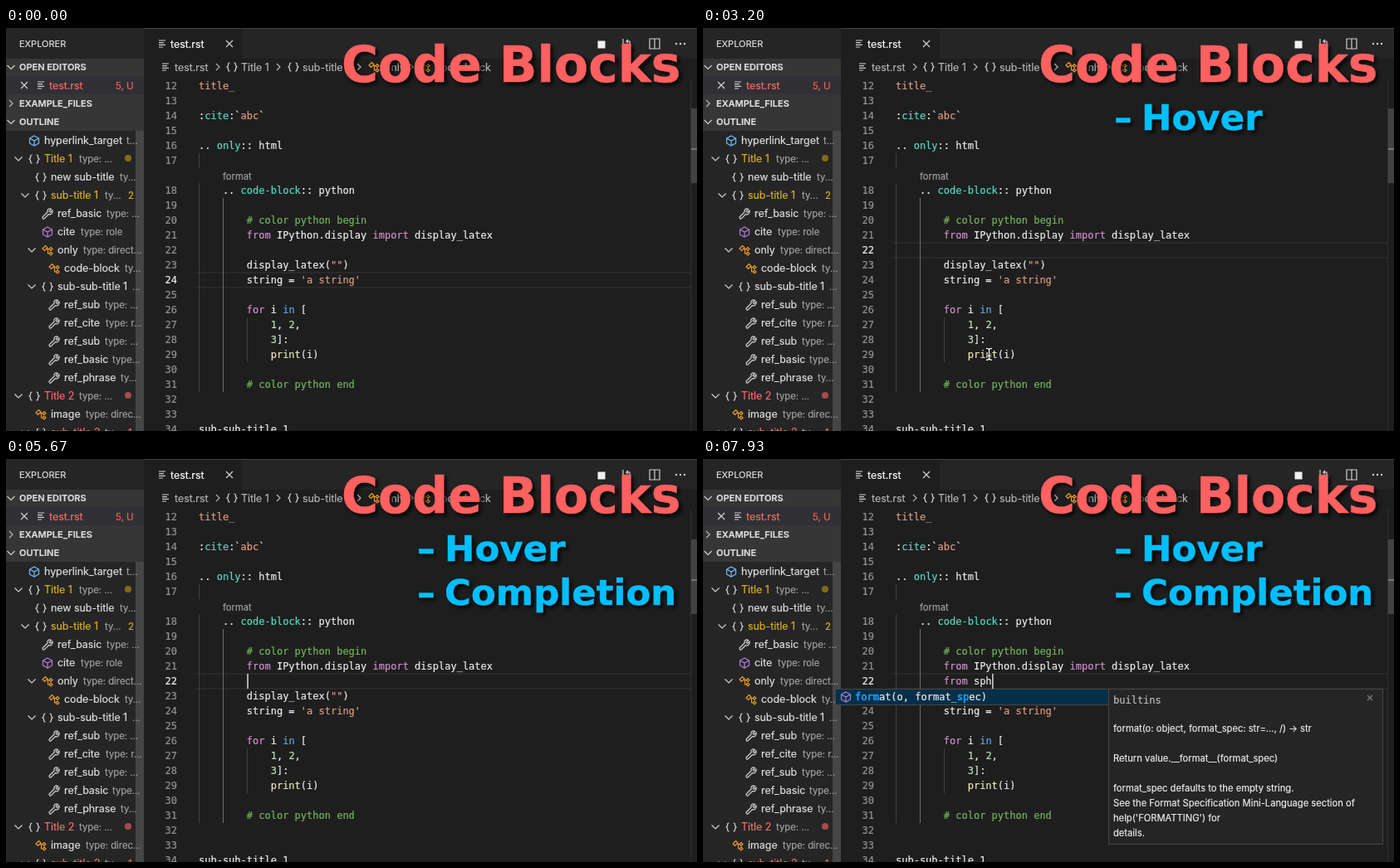
These frames come from a looping animation (832x486 px, 8000 ms). An HTML page:

```html
<!DOCTYPE html>
<html lang="en">
<head>
<meta charset="utf-8">
<title>Code Blocks</title>
<style>
html, body { margin: 0; width: 100%; height: 100%; overflow: hidden; background: #1e1e1e; }
svg { display: block; width: 100vw; height: 100vh; }
text { white-space: pre; font-family: Inter, "Liberation Sans", sans-serif; color: #dedede; fill: currentColor; stroke: currentColor; stroke-width: .2; }
.m { font: 12px "DejaVu Sans Mono", monospace; color: #ebebeb; }
.s { font-size: 12.4px; }
.d { font-size: 11.3px; color: #a0a0a0; }
.h { font-size: 11px; font-weight: 600; }
.t { font-size: 11.5px; color: #ebebeb; }
.u { font-size: 11.2px; color: #ebebeb; }
.big { font-family: "DejaVu Sans", Verdana, sans-serif; font-weight: bold; stroke-width: .5; filter: drop-shadow(3px 3px 2px rgba(0,0,0,.85)); }
.box { fill: #252526; stroke: #454545; }
.ln { fill: none; stroke-width: 1.2; }
</style>
</head>
<body>
<svg id="stage" viewBox="0 0 832 486"></svg>
<script>
const LOOP = 8000, CW = 7.224;
const COL = {
  p: '#cf8fc9', g: '#74b35e', c: '#56d8bf', o: '#db9c82', n: '#c0dbb2', b: '#5ea9e6',
  y: '#e8e8b8', v: '#9cdcfe', r: '#f44747', f: '#18a3ff'
};
const esc = s => s.replace(/&/g, '&amp;').replace(/</g, '&lt;').replace(/>/g, '&gt;');
// "{p word}" paints word with COL.p
const rich = s => esc(s).replace(/\{(\w) ([^}]*)\}/g, (_, k, w) =>
  `<tspan fill="${COL[k]}" stroke="${COL[k]}" stroke-width="${k === 'f' ? .6 : .2}">${w}</tspan>`);
const text = (x, y, s, cls, extra = '') => `<text x="${x}" y="${y}" class="${cls}" ${extra}>${rich(s)}</text>`;
const tint = c => `style="color:${c}"`;
const mono = (x, mid, s, extra) => text(x, mid + 4, s, 'm', extra);
const rect = (x, y, w, h, fill) => `<rect x="${x}" y="${y}" width="${w}" height="${h}" fill="${fill}"/>`;
const panel = (x, y, w, h) => `<rect x="${x + .5}" y="${y + .5}" width="${w - 1}" height="${h - 1}" class="box"/>`;
const path = (d, stroke, x = 0, y = 0) => `<path class="ln" d="${d}" stroke="${stroke}" transform="translate(${x} ${y})"/>`;
const group = (id, body) => `<g id="${id}">${body}</g>`;
const paras = (x, ys, lines, cls) => lines.map((s, i) => text(x, ys[i] + 4.3, s, cls)).join('');

const CUBE = 'M0-6L5.5-3V3L0 6L-5.5 3V-3ZM-5.5-3L0 0L5.5-3M0 0V6';
const icons = {
  cube: (x, y) => path(CUBE, '#75beff', x, y),
  method: (x, y) => path(CUBE, '#b180d7', x, y),
  cls: (x, y) => path('M-6-2L-2.5-5.5L0-3L-3.5 .5ZM-1.5-1.5H2M.5-1.5V4H2M2-1.5L4-3.5L6-1.5L4 .5ZM2 4L4 2L6 4L4 6Z', '#ee9d28', x, y),
  wrench: (x, y) => path('M-6 4L0-2C-1-5 2-7 4.5-5.5L2-3L3.5-1.5L6-4C7-1 4 2 1.5 .5L-4 6Q-6 6.5-6 4Z', '#d0d0d0', x, y),
  obj: (x, y) => path('M-2.5-5Q-4.5-5-4.5-3V-1.5L-6 0L-4.5 1.5V3Q-4.5 5-2.5 5M2.5-5Q4.5-5 4.5-3V-1.5L6 0L4.5 1.5V3Q4.5 5 2.5 5', '#d0d0d0', x, y),
  word: (x, y) => path('M-6-4.5H0M2-4.5H6M-6-1.5H-3M-1-1.5H6M-6 1.5H2M4 1.5H6M-6 4.5H-1M1 4.5H5', '#d0d0d0', x, y),
  file: (x, y) => path('M-4-4H4M-4-1.3H2M-4 1.3H4M-4 4H1', '#d0d0d0', x, y)
};
const down = (x, y) => path('M-4.5-2L0 2.5L4.5-2', '#d0d0d0', x, y);
const right = (x, y) => path('M-2-4L2 0L-2 4', '#b8b8b8', x, y);
const cross = (x, y, r = 4, color = '#d0d0d0') => path(`M${-r} ${-r}L${r} ${r}M${r} ${-r}L${-r} ${r}`, color, x, y);

const GOLD = '#d9b020', RED = '#f56c68';
// label x, icon, label, description x, description, has chevron, colour
const outline = [
  [46, 'cube', 'hyperlink_target', 145, 't...'],
  [46, 'obj', 'Title 1', 88, 'type: ...', 1, GOLD],
  [54, 'obj', 'new sub-title', 137, 'ty...'],
  [54, 'obj', 'sub-title 1', 119, 'ty...', 1, GOLD],
  [62, 'wrench', 'ref_basic', 121, 'type: ...'],
  [62, 'method', 'cite', 90, 'type: role'],
  [62, 'cls', 'only', 93, 'type: direct...', 1],
  [70, 'cls', 'code-block', 143, 'ty...'],
  [62, 'obj', 'sub-sub-title 1', 152, '...', 1],
  [70, 'wrench', 'ref_sub', 119, 'type: ...'],
  [70, 'wrench', 'ref_cite', 120, 'type: r...'],
  [70, 'wrench', 'ref_sub', 119, 'type: ...'],
  [70, 'wrench', 'ref_basic', 128, 'type...'],
  [70, 'wrench', 'ref_phrase', 138, 'ty...'],
  [46, 'obj', 'Title 2', 88, 'type: ...', 1, RED],
  [54, 'cls', 'image', 96, 'type: direc...'],
  [54, 'obj', 'sub-title 2', 119, 'ty...', 1, RED]
];

function sidebar() {
  let s = rect(0, 0, 166, 486, '#252526') + rect(0, 37, 166, 21, '#363637') +
    rect(0, 58, 166, 22, '#303034') + rect(0, 80, 166, 44, '#363637') + rect(156, 124, 10, 362, '#464647');
  s += text(16, 23, 'EXPLORER', 'h', 'style="font-weight:400"');
  s += text(16, 51, 'OPEN EDITORS', 'h') + text(16, 95, 'EXAMPLE_FILES', 'h') + text(16, 117, 'OUTLINE', 'h');
  s += down(6, 47) + right(6, 91) + down(6, 113) + cross(22, 69) + icons.file(42, 69);
  s += text(52, 73.5, 'test.rst', 's', tint(RED)) + text(132, 73.5, '5, U', 't', tint('#e8605e'));
  outline.forEach(([x, icon, label, dx, desc, open, color = '#dedede'], i) => {
    const y = 136 + 22 * i;
    s += icons[icon](x - 12, y) + (open ? down(x - 31, y - .5) : '') +
      text(x, y + 4.3, label, 's', tint(color)) + text(dx, y + 4.3, desc, 'd');
  });
  s += `<circle cx="147" cy="157" r="4" fill="#806c18"/><circle cx="147" cy="443" r="4" fill="#a44c4b"/>`;
  return s + text(147, 206, '2', 't', tint(GOLD)) + text(147, 492, '1', 't', tint(RED));
}

function header() {
  let s = rect(166, 0, 666, 37, '#252526') + rect(166, 0, 119, 37, '#1e1e1e') + rect(0, 0, 832, 1, '#454545');
  s += icons.file(188, 19) + text(198, 23.7, 'test.rst', 's', tint('#fff')) + cross(269, 19);
  s += rect(712.5, 15.5, 9, 9, '#f0f0f0');
  s += path('M-4-6V2M-4 2L-1 2M4 6V-3H0L2-5M0-3L2-1', '#d0d0d0', 747, 19);
  s += path('M-6-6H6V6H-6ZM0-6V6', '#d0d0d0', 781, 19);
  s += [807, 812, 817].map(x => `<circle cx="${x}" cy="19" r="1.2" fill="#d0d0d0"/>`).join('');
  s += icons.file(192, 47) + icons.obj(272, 47) + icons.obj(346, 47) + icons.cls(443, 47) + icons.cls(504, 47);
  s += [255, 328, 425, 488].map(x => right(x, 47)).join('');
  [[203, 'test.rst'], [283, 'Title 1'], [357, 'sub-title 1'], [456, 'only'], [517, 'code-block']]
    .forEach(([x, w]) => s += text(x, 51.7, w, 's', tint('#b4b4b4')));
  return s;
}

// line number: [indent, code]
const code = {
  12: [0, '{o title_}'],
  14: [0, ':{c cite}:`{o abc}`'],
  16: [0, '.. {c only}:: html'],
  18: [4, '.. {c code-block}:: python'],
  20: [8, '{g # color python begin}'],
  21: [8, '{p from} IPython.display {p import} display_latex'],
  23: [8, 'display_latex({o ""})'],
  24: [8, "string = {o 'a string'}"],
  26: [8, '{p for} i {b in} ['],
  27: [12, '{n 1}, {n 2},'],
  28: [12, '{n 3}]:'],
  29: [12, '{y print}(i)'],
  31: [8, '{g # color python end}'],
  34: [0, 'sub-sub-title 1']
};
const lineY = n => n < 18 ? 70 + 18 * (n - 12) : 196 + 18 * (n - 18);
const colX = c => 232 + c * CW;

function editor() {
  let s = rect(232, 151, 1, 18, '#404040') + rect(232, 187, 1, 252, '#404040') +
    rect(261, 205, 1, 234, '#6c6c6c') + rect(290, 349, 1, 54, '#404040');
  for (let n = 12; n <= 34; n++) {
    s += mono(206, lineY(n), '' + n, `id="n${n}" text-anchor="end" ${tint('#909090')}`);
    if (code[n]) s += mono(colX(code[n][0]), lineY(n), code[n][1]);
  }
  s += text(261, 183, 'format', 'u', tint('#a0a0a0'));
  return s + rect(824, 61, 1, 425, '#303030') + rect(825, 97, 7, 90, '#424242') + rect(825, 145, 7, 2, '#777');
}

const hoverLatex = () => panel(319, 68, 502, 175) + rect(320, 95, 500, 1, '#404040') +
  mono(327, 82, 'display_latex(*objs, {v raw}={b False}, {v metadata}={b None})') +
  text(327, 113.3, 'Display the LaTeX representation of an object.', 't') +
  text(327, 148.5, 'Parameters', 't', 'style="font-size:17.8px;font-weight:600"') +
  paras(327, [175, 193, 211, 229], [
    'objs : tuple of objects The Python objects to display, or if raw=True raw latex data to',
    'display. raw : bool Are the data objects raw data or Python objects that need to be',
    'formatted before display? [default: False] metadata : dict (optional) Metadata to be',
    'associated with the specific mimetype output.'], 't');

const hoverPrint = () => panel(319, 234, 502, 153) +
  rect(320, 279, 500, 1, '#404040') + rect(320, 306, 500, 1, '#404040') +
  mono(327, 248, '{y print}(*values: {c object}, sep: {c Text}=..., end: {c Text}=..., {v file}: Optiona') +
  mono(327, 266, 'l[_Writer]=..., {v flush}: {c bool}=...) {r ->} {b None}') +
  paras(327, [293, 319, 337, 355, 373], [
    "print(value, ..., sep=' ', end='\\n', file=sys.stdout, flush=False)",
    'Prints the values to a stream, or to sys.stdout by default. Optional keyword arguments:',
    'file: a file-like object (stream); defaults to the current sys.stdout. sep: string inserted',
    'between values, default a space. end: string appended after the last value, default a',
    'newline. flush: whether to forcibly flush the stream.'], 't');

const list = items => panel(159, 277, 330, items.length * 18 + 2) + rect(160, 278, 328, 18, '#062f4a') +
  items.map(([icon, s], i) => icons[icon](172, 287 + 18 * i) + mono(183, 287 + 18 * i, s)).join('');
const docs = (h, ys, lines) => panel(488, 277, 331, h) + mono(494, 291, 'builtins', tint('#bcbcbc')) +
  cross(803, 288, 3, '#808080') + paras(494, ys, lines, 'u');

const listF = () => list([
  ['method', '{f f}ilter(function, iterable)'], ['cls', '{f f}loat'], ['word', '{f f}or'],
  ['method', '{f f}ormat(o, format_spec)'], ['word', '{f f}rom'], ['cls', '{f f}rozenset'], ['word', '{f F}alse'],
  ['cls', '{f F}ileExistsError'], ['cls', '{f F}ileNotFoundError'], ['cls', '{f F}loatingPointError'],
  ['cls', '{f F}utureWarning']
]) + docs(230, [325, 343, 361, 379, 415, 451, 469, 487], [
  'filter(function: Callable[[_T], Any], iterable: Iterable[_T], /) ->', 'Iterator[_T]',
  'filter(function: None, iterable: Iterable[Optional[_T]], /) ->', 'Iterator[_T]',
  'filter(function or None, iterable) --> filter object',
  'Return an iterator yielding those items of iterable for', 'which function(item)',
  'is true. If function is None, return the items that are true.'
]);
const listFr = () => list([['word', '{f fr}om'], ['cls', '{f fr}ozenset'], ['method', '{f f}o{f r}mat(o, format_spec)']]);
const listSp = () => list([['method', '{f form}at(o, format_{f sp}ec)']]) + docs(188, [325, 361, 397, 415, 433, 451], [
  'format(o: object, format_spec: str=..., /) -> str', 'Return value.__format__(format_spec)',
  'format_spec defaults to the empty string.', 'See the Format Specification Mini-Language section of',
  "help('FORMATTING') for", 'details.'
]);

const big = (x, y, size, color, s) => text(x, y, s, 'big', `style="font-size:${size}px;color:${color}"`);
const bullet = (y, s) => big(495, y, 43.5, '#00bfff', '–') + big(528, y, 43.5, '#00bfff', s);
const BEAM = 'M-3.5-7Q0-7 0-5Q0-7 3.5-7M0-5V5M-3.5 7Q0 7 0 5Q0 7 3.5 7M-2 2H2';

const stage = document.getElementById('stage');
stage.innerHTML = rect(0, 0, 832, 486, '#1e1e1e') +
  group('active', rect(228, -9.5, 596, 1, '#343434') + rect(228, 8.5, 596, 1, '#343434')) +
  group('latexWord', rect(492, 241, 94, 18, '#203040')) + group('printWord', rect(319, 385, 36, 18, '#203040')) +
  editor() + header() + sidebar() +
  mono(colX(8), lineY(22), '', 'id="typed"') + group('caret', rect(0, 259, 1.5, 18, '#d8d8d8')) +
  group('latex', hoverLatex()) + group('print', hoverPrint()) +
  group('listF', listF()) + group('listFr', listFr()) + group('listSp', listSp()) +
  big(404, 65, 60, '#ff6060', 'Code Blocks') +
  group('hover', bullet(123, 'Hover')) + group('completion', bullet(176, 'Completion')) +
  group('mouse', `<path d="${BEAM}" fill="none" stroke="#111" stroke-width="3"/><path d="${BEAM}" fill="none" stroke="#fff" stroke-width="1.3"/>`);

const $ = id => document.getElementById(id);
const show = (id, on) => $(id).style.display = on ? '' : 'none';
const ramp = (t, a, b) => Math.max(0, Math.min(1, (t - a) / (b - a)));
const ease = u => u * u * (3 - 2 * u);

const CLICK = 690, TAB = 5300;
const keys = [[6650, 'f'], [7080, 'fr'], [7220, 'fro'], [7350, 'from'], [7480, 'from '], [7620, 'from s'], [7740, 'from sp'], [7880, 'from sph']];
// time, x, y
const trail = [[350, 640, 330], [650, 557, 265], [1050, 557, 265], [1250, 547, 258], [2500, 547, 258], [3250, 342, 395], [4450, 342, 395], [4950, 400, 330]];

function mouseAt(t) {
  let [, x, y] = trail[0];
  for (let i = 1; i < trail.length; i++) {
    const [a, x0, y0] = trail[i - 1], [b, x1, y1] = trail[i];
    if (t < a) break;
    const u = ease(ramp(t, a, b));
    x = x0 + (x1 - x0) * u;
    y = y0 + (y1 - y0) * u;
  }
  return [x, y];
}

function draw(t) {
  const line = t < CLICK ? 24 : 22;
  $('active').setAttribute('transform', `translate(0 ${lineY(line)})`);
  [22, 24].forEach(n => $('n' + n).style.color = n === line ? '#ebebeb' : '#909090');

  const [last, word] = keys.filter(k => k[0] <= t).pop() || [t < TAB ? CLICK : TAB, ''];
  $('typed').innerHTML = rich(word.replace(/^from/, '{p from}'));
  const col = t < TAB ? 0 : 8 + word.length;
  $('caret').setAttribute('transform', `translate(${colX(col) + .5} 0)`);
  show('caret', t >= CLICK && Math.floor((t - last) / 500) % 2 === 0);

  ['latex', 'latexWord'].forEach(id => show(id, t >= 1550 && t < 2550));
  ['print', 'printWord'].forEach(id => show(id, t >= 3650 && t < 4500));
  show('listF', t >= 6780 && t < 7080);
  show('listFr', t >= 7080 && t < 7480);
  show('listSp', t >= 7620);

  $('hover').style.opacity = ramp(t, 700, 1100);
  $('completion').style.opacity = ramp(t, 4700, 5100);

  const [x, y] = mouseAt(t);
  $('mouse').setAttribute('transform', `translate(${x} ${y})`);
  show('mouse', t >= 350 && t < TAB);
}

const start = performance.now();
function tick(now) {
  draw(Math.max(0, now - start) % LOOP);
  requestAnimationFrame(tick);
}
draw(0);
requestAnimationFrame(tick);
</script>
</body>
</html>
```
